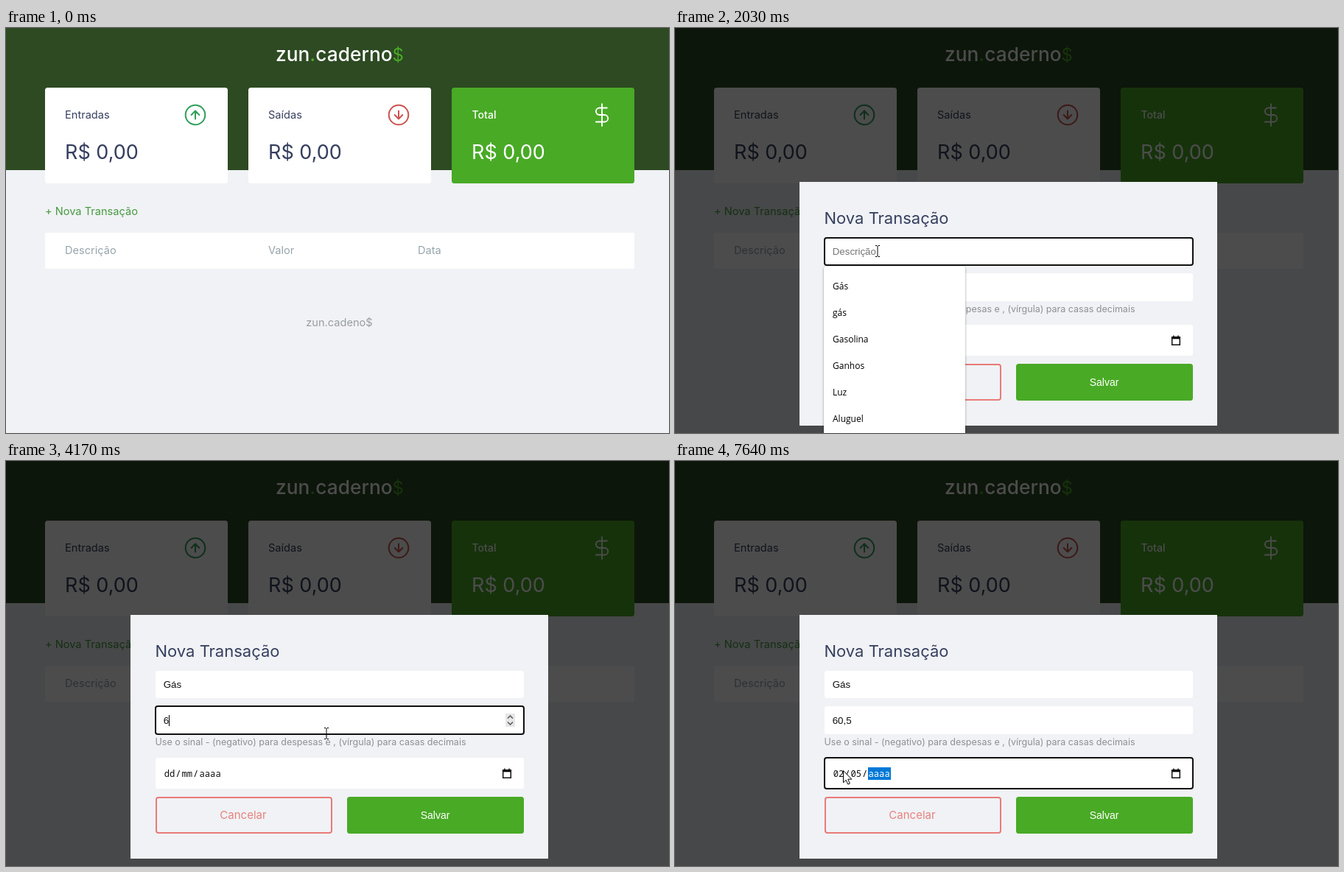
Recreate the animation shown at these times as an HTML page. Size 900x550 px, loop 8 s.

```html
<!DOCTYPE html>
<html lang="pt-BR">
<head>
<meta charset="utf-8">
<title>Controle financeiro</title>
<style>
  html, body { margin: 0; width: 100%; height: 100%; overflow: hidden; background: #f0f2f5; }
  svg { display: block; width: 900px; height: 550px; font: 14.6px Inter, sans-serif; }
  .dark { fill: #363f5f; }
  .money { font-size: 27px; }
  .head { fill: #96a5ab; }
  .icon { fill: none; stroke-width: 2; stroke-linecap: round; stroke-linejoin: round; }
  .input { font: 13.33px "Liberation Sans", Arial, sans-serif; }
  .mono { font: 12.2px "Noto Sans Mono", monospace; }
  .option { font: 12px "Open Sans", sans-serif; }
  .focus { fill: none; stroke: #101010; stroke-width: 2; }
  #list { filter: drop-shadow(0 1px 1.5px rgba(0, 0, 0, .4)); }
</style>
</head>
<body>
<svg viewBox="0 0 900 550">
  <rect width="900" height="550" fill="#f0f2f5"/>
  <rect width="900" height="193" fill="#2d4a22"/>
  <text x="366" y="45" font-size="26.3" font-weight="500" fill="#fff">zun<tspan fill="#49aa26">.</tspan>caderno<tspan fill="#49aa26" font-size="24" font-weight="400">$</tspan></text>

  <g fill="#fff">
    <rect x="53" y="81" width="248" height="130" rx="3.5"/>
    <rect x="329" y="81" width="248" height="130" rx="3.5"/>
    <rect x="605" y="81" width="248" height="130" rx="3.5" fill="#49aa26"/>
    <rect x="53" y="278" width="800" height="49" rx="2"/>
  </g>
  <g class="dark">
    <text x="80" y="123">Entradas</text>
    <text x="356" y="123">Saídas</text>
    <text x="632.5" y="123" fill="#fff" font-size="14.1" font-weight="500">Total</text>
    <g class="money">
      <text x="80" y="178">R$ 0,00</text>
      <text x="356" y="178">R$ 0,00</text>
      <text x="632" y="178" fill="#fff">R$ 0,00</text>
    </g>
  </g>
  <g class="icon">
    <g transform="translate(257 118)" stroke="#2f9e5b"><circle r="13.3"/><path d="M0 5.5V-5.5M-5.3 0L0-5.5L5.3 0"/></g>
    <g transform="translate(533 118)" stroke="#cb5350"><circle r="13.3"/><path d="M0-5.5V5.5M-5.3 0L0 5.5L5.3 0"/></g>
    <path transform="translate(792.7 101.7) scale(1.36)" stroke="#fff" stroke-width="1.35" d="M12 1V23M17 5H9.5a3.5 3.5 0 0 0 0 7h5a3.5 3.5 0 0 1 0 7H6"/>
  </g>
  <text id="link" x="53" y="254">+ Nova Transação</text>
  <g class="head">
    <text x="80" y="307">Descrição</text>
    <text x="356" y="307">Valor</text>
    <text x="559" y="307">Data</text>
  </g>
  <text x="452.5" y="405" text-anchor="middle" fill="#999da1">zun.cadeno$</text>

  <g id="modal">
    <rect width="900" height="550" opacity=".7"/>
    <rect x="169" y="209" width="567" height="331" fill="#f0f2f5"/>
    <text x="202.5" y="266" font-size="22" class="dark">Nova Transação</text>
    <g fill="#fff">
      <rect x="203" y="285" width="500" height="37" rx="3"/>
      <rect x="203" y="333" width="500" height="38" rx="3"/>
      <rect x="203" y="403" width="500" height="42" rx="3"/>
    </g>
    <text x="202.5" y="386" font-size="12.5" fill="#8e9094">Use o sinal - (negativo) para despesas e , (vírgula) para casas decimais</text>
    <g class="icon" stroke="#e97b78">
      <rect x="204" y="457" width="238" height="48" rx="3"/>
    </g>
    <text x="322" y="486" font-size="15" text-anchor="middle" fill="#e8827f">Cancelar</text>
    <rect x="463" y="456" width="240" height="50" rx="3.5" fill="#49aa26"/>
    <text x="582.5" y="486" text-anchor="middle" fill="#fff" style="font: 14px 'Liberation Sans', Arial, sans-serif">Salvar</text>
    <path d="M674.7 419.7H685.3V430.3H674.7ZM677 417.5V420M683 417.5V420" fill="none" stroke="#111" stroke-width="1.5"/>
    <path d="M674 419H686V422.3H674Z"/>

    <text id="desc" class="input" x="213.7" y="308"></text>
    <text id="amount" class="input" x="213.7" y="357"></text>
    <g id="spin">
      <rect x="678" y="343" width="13" height="18" fill="#e6e6e6"/>
      <path d="M681 349.5L684.5 346L688 349.5M681 354.5L684.5 358L688 354.5" fill="none" stroke="#555" stroke-width="1.5"/>
    </g>
    <rect id="mark" y="416" height="17" fill="#0078d7"/>
    <g class="mono">
      <text id="day" x="214.8" y="429"></text>
      <text x="230.2" y="429">/</text>
      <text id="month" x="238.4" y="429"></text>
      <text x="254" y="429">/</text>
      <text id="year" x="262.5" y="429">aaaa</text>
    </g>
    <rect id="ring" class="focus" x="203" width="500" rx="3"/>
    <rect id="caret" width="1" height="15"/>
    <g id="list">
      <rect id="panel" x="202" y="324" width="192" rx="3" fill="#fff"/>
      <g id="options" class="option"></g>
    </g>
  </g>

  <g id="pointer">
    <circle id="click" r="12.5" fill="#ffff30" opacity=".65"/>
    <path id="arrow" d="M.5.5V16.8L4.2 13.3L6.8 19L9.3 18L6.8 12.2H11.8Z" fill="#fff" stroke="#000"/>
    <path id="hand" d="M.5 13.5V2.2C.5.2 3.5.2 3.5 2.2V8C4.5 6.6 6.6 7 6.6 8.6C7.6 7.6 9.5 8 9.6 9.5C10.6 8.7 12.3 9.2 12.3 10.8V15.5C12.3 17.7 11 19 10.8 22.5H2.5C2.4 19.5-1.8 16.6-4-13.2V13.2C-4.5 11.3-2.6 10.9-1.5 12Z" fill="#fff" stroke="#000"/>
    <path id="beam" d="M-3-7.5H-1L0-6.5L1-7.5H3M0-6.5V6.5M-3 7.5H-1L0 6.5L1 7.5H3" fill="none" stroke="#000"/>
  </g>
</svg>
<script>
  const LOOP = 8000, TICK = 70;
  const el = Object.fromEntries([...document.querySelectorAll('[id]')].map(n => [n.id, n]));
  el.hand.setAttribute('d', 'M.5 13.5V2.2C.5.2 3.5.2 3.5 2.2V8C4.5 6.6 6.6 7 6.6 8.6C7.6 7.6 9.5 8 9.6 9.5C10.6 8.7 12.3 9.2 12.3 10.8V15.5C12.3 17.7 11 19 10.8 22.5H2.5C2.4 19.5-2 17-4.4 13.4C-5.2 11.6-2.8 10.8-1.6 12Z');

  const set = (node, attrs) => { for (const k in attrs) node.setAttribute(k, attrs[k]); };
  const show = (node, on) => node.style.display = on ? '' : 'none';
  const write = (node, text) => { if (node.textContent !== text) node.textContent = text; };
  // Latest row [time, value] already reached.
  const at = (rows, t) => rows.findLast(row => row[0] <= t);

  const linear = p => p;
  const easeOut = p => 1 - (1 - p) ** 2;
  const smooth = p => p * p * (3 - 2 * p);
  const moves = [
    { start: 70, steps: 7, from: [680, 640], to: [139, 251], ease: easeOut },
    { start: 1160, steps: 5, from: [139, 251], to: [275, 303], ease: smooth },
    { start: 2690, steps: 3, from: [275, 303], to: [302, 331], ease: linear },
    { start: 2900, steps: 3, from: [302, 331], to: [435, 370], ease: linear },
    { start: 5240, steps: 8, from: [435, 370], to: [228, 420], ease: smooth }
  ];
  const clicks = [[820, 890], [1500, 1570], [3180, 3240], [5840, 5910]];
  const OPEN = 890;
  const focus = [[0, ''], [1500, 'desc'], [3180, 'amount'], [5840, 'date']];
  const rings = { desc: [285, 37], amount: [333, 38], date: [403, 42] };
  const typed = {
    desc: [[0, ''], [2100, 'G'], [2500, 'Gá'], [2570, 'Gás']],
    amount: [[0, ''], [4170, '6'], [4300, '60'], [4770, '60,'], [4970, '60,5']],
    day: [[0, 'dd'], [6510, '00'], [6640, '02']],
    month: [[0, 'mm'], [7370, '00'], [7640, '05']]
  };
  const hints = { desc: 'Descrição', amount: '0,00' };
  const marks = [[0, ''], [5840, 'day'], [6640, 'month'], [7640, 'year']];
  const markBox = { day: [214, 17], month: [237.5, 16.5], year: [262, 31] };
  const lists = [[0, 0], [1570, 6], [2170, 4], [2500, 2], [3180, 0]];

  const options = ['Gás', 'gás', 'Gasolina', 'Ganhos', 'Luz', 'Aluguel'].map((word, i) => {
    const node = document.createElementNS('http://www.w3.org/2000/svg', 'text');
    set(node, { x: 214, y: 355 + 36 * i });
    node.textContent = word;
    return el.options.appendChild(node);
  });

  function pointerAt(t) {
    const move = moves.findLast(m => m.start <= t);
    if (!move) return null;
    const step = Math.floor((t - move.start) / TICK) + 1;
    const p = move.ease(Math.min(1, step / move.steps));
    return move.from.map((v, i) => v + (move.to[i] - v) * p);
  }

  function drawPointer(t, listed) {
    const pos = pointerAt(t);
    show(el.pointer, pos);
    if (!pos) return false;
    const [x, y] = pos;
    const open = t >= OPEN;
    const onLink = !open && x > 53 && x < 181 && y > 238 && y < 262;
    const onList = listed && x < 394 && y > 324;
    const inField = open && !onList && x > 203 && x < 703 &&
      ((y > 285 && y < 322) || (y > 333 && y < 371));
    set(el.pointer, { transform: `translate(${Math.round(x)} ${Math.round(y)})` });
    show(el.hand, onLink);
    show(el.beam, inField);
    show(el.arrow, !onLink && !inField);
    show(el.click, clicks.some(([a, b]) => t >= a && t < b));
    return onLink;
  }

  function drawForm(t, listed) {
    const [since, field] = at(focus, t);
    show(el.ring, field);
    if (field) set(el.ring, { y: rings[field][0], height: rings[field][1] });

    for (const id of ['desc', 'amount']) {
      const text = at(typed[id], t)[1];
      write(el[id], text || hints[id]);
      set(el[id], { fill: text ? '#111' : '#757575' });
    }
    const editing = field === 'desc' || field === 'amount';
    const last = editing ? Math.max(since, at(typed[field], t)[0]) : 0;
    show(el.caret, editing && (t - last) % 1060 < 530);
    if (editing) {
      const length = at(typed[field], t)[1] ? el[field].getComputedTextLength() : 0;
      set(el.caret, { x: Math.round(214 + length), y: field === 'desc' ? 296 : 345 });
    }
    show(el.spin, t >= 3040 && t < 5840);

    const marked = at(marks, t)[1];
    show(el.mark, marked);
    if (marked) set(el.mark, { x: markBox[marked][0], width: markBox[marked][1] });
    for (const id of ['day', 'month', 'year']) {
      if (typed[id]) write(el[id], at(typed[id], t)[1]);
      set(el[id], { fill: id === marked ? '#fff' : '#111' });
    }

    show(el.list, listed);
    set(el.panel, { height: 16 + 36 * listed });
    options.forEach((node, i) => show(node, i < listed));
  }

  function frame() {
    const t = performance.now() % LOOP;
    const listed = at(lists, t)[1];
    show(el.modal, t >= OPEN);
    drawForm(t, listed);
    const hover = drawPointer(t, listed);
    set(el.link, { fill: hover ? '#3dd020' : '#469a3f' });
    requestAnimationFrame(frame);
  }
  frame();
</script>
</body>
</html>
```
